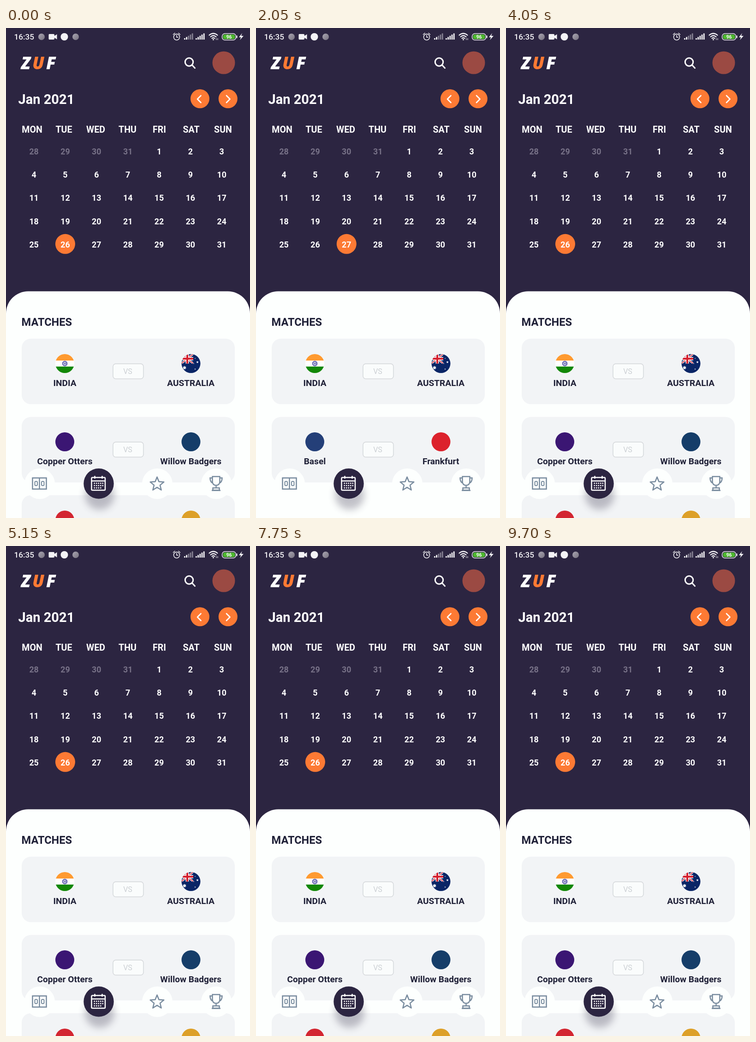
Recreate the animation shown at these times as an HTML page. Size 529x1058 px, loop 9750 ms.

```html
<!DOCTYPE html>
<html lang="en">
<head>
<meta charset="utf-8">
<title>Match calendar</title>
<style>
html, body { margin: 0; width: 100%; height: 100%; overflow: hidden; background: #2c2541; }
svg { display: block; width: 100vw; height: 100vh; }
text { font-family: Roboto, Arial, sans-serif; }
.mid { text-anchor: middle; }
.team { font-size: 19.1px; font-weight: 700; fill: #1f2037; text-anchor: middle; }
.day { font-size: 17.8px; font-weight: 700; fill: #fff; text-anchor: middle; }
.day.out { fill: #777187; }
.weekday { font-size: 19.6px; font-weight: 700; fill: #fff; text-anchor: middle; }
.line { fill: none; stroke-linecap: round; stroke-linejoin: round; }
</style>
</head>
<body>
<svg viewBox="0 0 529 1058" preserveAspectRatio="none">
  <defs>
    <clipPath id="disc"><circle r="20.5"/></clipPath>
    <filter id="soft" x="-60%" y="-60%" width="220%" height="220%"><feGaussianBlur stdDeviation="8"/></filter>
    <linearGradient id="ball" x2="1" y2="1"><stop stop-color="#aaa6b2"/><stop offset="1" stop-color="#77727f"/></linearGradient>
    <g id="india" clip-path="url(#disc)">
      <rect x="-21" y="-21" width="42" height="42" fill="#fff"/>
      <rect x="-21" y="-21" width="42" height="14.500" fill="#ff9a30"/>
      <rect x="-21" y="6.500" width="42" height="14.500" fill="#138808"/>
      <circle r="5" fill="none" stroke="#35379c" stroke-width="1.3"/>
      <circle r="3" fill="none" stroke="#35379c" stroke-width="2" stroke-dasharray=".7 .9"/>
      <circle r="1.3" fill="#35379c"/>
    </g>
    <g id="australia" clip-path="url(#disc)">
      <rect x="-21" y="-21" width="42" height="42" fill="#0a2566"/>
      <svg x="-21" y="-21" width="26" height="21" viewBox="-13 -10.500 26 21" fill="none">
        <path d="M-13-10.500 13 10.500M13-10.500-13 10.500" stroke="#fff" stroke-width="4"/>
        <path d="M-13-10.500 13 10.500M13-10.500-13 10.500" stroke="#d5202f" stroke-width="1.500"/>
        <path d="M0-11V11M-13 0H13" stroke="#fff" stroke-width="7"/>
        <path d="M0-11V11M-13 0H13" stroke="#d5202f" stroke-width="4"/>
      </svg>
      <g id="stars" fill="#fff"></g>
    </g>
  </defs>

  <rect width="529" height="1058" fill="#2c2541"/>

  <!-- status bar -->
  <g fill="#f4f3f6">
    <text x="17.500" y="25" font-size="17.200" font-weight="500">16:35</text>
    <circle cx="77" cy="19" r="7" fill="url(#ball)"/>
    <path d="M94 13h9q2 0 2 2v2l5.500-3.500v11L105 21v2q0 2-2 2h-9q-1.500 0-1.500-2v-8q0-2 1.500-2z"/>
    <circle cx="126.500" cy="19" r="8"/>
    <circle cx="151" cy="19" r="7" fill="url(#ball)"/>
    <g class="line" stroke="#f4f3f6" stroke-width="1.500">
      <circle cx="370" cy="19.500" r="6.500"/>
      <path d="M370 15.500v4.500h3M362.500 14l3.500-3M377.500 14l-3.500-3"/>
    </g>
    <g id="signal"></g>
    <g class="line" stroke="#f4f3f6" stroke-width="2.200">
      <path d="M440.500 15.500q9-7.500 18 0M443.500 19q6-5 12 0M446.500 22.300q3-2.400 6 0"/>
    </g>
    <circle cx="449.500" cy="25" r="1.600"/>
    <path d="M456 22v4M459 22v4" stroke="#f4f3f6"/>
    <rect x="468.500" y="12" width="30" height="14" rx="6" fill="none" stroke="#e9e8ed" stroke-width="1.500"/>
    <rect x="470.500" y="14" width="26" height="10" rx="4" fill="#4db82e"/>
    <rect x="499.500" y="16" width="2" height="6" rx="1"/>
    <text x="483.500" y="23" class="mid" font-size="10.500" font-weight="700">96</text>
    <path d="M512 11l-7 9h4.500l-2.500 6 8-9h-5z"/>
  </g>

  <!-- header -->
  <text x="33" y="89" font-size="37" font-weight="800" font-style="italic" letter-spacing="4" fill="#fff"
    style="font-family:'Open Sans','Noto Sans',sans-serif">Z<tspan fill="#ff7a33">U</tspan>F</text>
  <g class="line" stroke="#fff" stroke-width="3">
    <circle cx="397" cy="73.500" r="8.700"/><path d="M403.500 80l6 6.500"/>
  </g>
  <circle cx="472" cy="75" r="24.500" fill="#9b4a43"/>
  <text id="month" x="26.500" y="163.500" font-size="29" font-weight="700" fill="#fff"></text>
  <g fill="#fd7a34"><circle cx="420.500" cy="152.700" r="20.500"/><circle cx="481.300" cy="152.700" r="20.500"/></g>
  <path class="line" d="M422.500 146l-7.500 7.500 7.500 7.500M478 146l7.500 7.500-7.500 7.500" stroke="#fff" stroke-width="2.700"/>
  <g id="weekdays"></g>
  <g id="days"></g>

  <!-- match sheet -->
  <path d="M0 1058V616.500a48 48 0 0 1 48-48H481a48 48 0 0 1 48 48V1058z" fill="#fdfffe"/>
  <text x="33.500" y="643" font-size="23.600" font-weight="700" fill="#1f2037">MATCHES</text>
  <g id="matches"></g>

  <!-- navigation -->
  <circle cx="203" cy="1008" r="32" fill="#2c2541" opacity=".28" filter="url(#soft)"/>
  <g fill="#fdfffe"><circle cx="73" cy="984" r="33"/><circle cx="328" cy="984" r="33"/><circle cx="456" cy="984" r="33"/></g>
  <circle cx="201" cy="983.700" r="32.700" fill="#2c2541"/>
  <g fill="none" stroke="#788b9e" stroke-width="2.500">
    <path d="M57.500 971.500h30v24h-30zM72.500 971.500v24"/>
    <rect x="62.500" y="979" width="5.500" height="9" rx="2" stroke-width="2"/>
    <rect x="77" y="979" width="5.500" height="9" rx="2" stroke-width="2"/>
    <path id="star" stroke-linejoin="round"/>
    <path d="M447.500 968.500h16v10q0 9-8 9t-8-9zM447.500 971.500h-5q0 10 6.500 11M463.500 971.500h5q0 10-6.500 11M455.500 987.500v5M448.500 998v-5h14v5zM446 998.500h19"/>
  </g>
  <g fill="none" stroke="#fff" stroke-width="2.500">
    <rect x="185.500" y="970.500" width="29.500" height="27.500" rx="2"/>
    <path d="M186 978h29M192.500 967v6M208.500 967v6"/>
    <path d="M190.500 983h21M190.500 988h21M190.500 993h17" stroke-dasharray="2.500 2"/>
  </g>
</svg>
<script>
const LOOP = 9750;
const el = id => document.getElementById(id);
const range = n => [...Array(n).keys()];

const starPath = (cx, cy, outer, inner, points) => 'M' + range(points * 2).map(i => {
  const r = i % 2 ? inner : outer, a = Math.PI * (i / points - .5);
  return `${(cx + r * Math.cos(a)).toFixed(2)} ${(cy + r * Math.sin(a)).toFixed(2)}`;
}).join('L') + 'z';

el('star').setAttribute('d', starPath(327.5, 985, 15.5, 6.8, 5));
el('stars').innerHTML = [[-14, 9, 4.5], [9, -11, 1.2], [14, -3, 2.6], [6, 0, 1.2], [9, 12, 1.4]]
  .map(([x, y, r]) => `<path d="${starPath(x, y, r, r * .5, 7)}"/>`).join('');

el('signal').innerHTML = [[386, 2], [411, 5]].map(([x, strong]) => range(5).map(i => {
  const h = 3 + i * 2.6;
  return `<rect x="${x + i * 4.2}" y="${25 - h}" width="2.8" height="${h}" opacity="${i < strong ? 1 : .45}"/>`;
}).join('')).join('');

el('weekdays').innerHTML = ['MON', 'TUE', 'WED', 'THU', 'FRI', 'SAT', 'SUN']
  .map((d, i) => `<text class="weekday" x="${56.5 + i * 69}" y="226">${d}</text>`).join('');

// A month grid: trailing days of the previous month, this month, then the next.
function daysHtml(lead, prevLength, length, selected) {
  return range(35).map(i => {
    const n = i - lead + 1, inside = n > 0 && n <= length;
    const label = n < 1 ? prevLength + n : inside ? n : n - length;
    const x = 60.6 + i % 7 * 67.85, row = Math.floor(i / 7) * 50.4;
    const mark = inside && n === selected
      ? `<circle cx="${x}" cy="${264.7 + row}" r="21.5" fill="#fd7a34"/>` : '';
    return `${mark}<text class="day${inside ? '' : ' out'}" x="${x}" y="${272.6 + row}">${label}</text>`;
  }).join('');
}

const flag = id => (x, y) => `<use href="#${id}" x="${x}" y="${y}"/>`;
const badge = color => (x, y) => `<circle cx="${x}" cy="${y}" r="20.5" fill="${color}"/>`;

const nations = ['INDIA', flag('india'), 'AUSTRALIA', flag('australia')];
const clubs = ['Copper Otters', badge('#3b1673'), 'Willow Badgers', badge('#153d69')];
const cities = ['Basel', badge('#243f78'), 'Frankfurt', badge('#dc222c')];
const crests = ['', badge('#d32631'), '', badge('#dda028')];

const matchesHtml = list => list.map(([home, homeMark, away, awayMark], i) => {
  const y = 670.7 + i * 169;
  return `<rect x="34" y="${y}" width="462" height="141.5" rx="20" fill="#f2f4f6"/>
    ${homeMark(127.5, y + 53.8)}${awayMark(401, y + 53.8)}
    <text class="team" x="127.5" y="${y + 102.6}">${home}</text>
    <text class="team" x="400.7" y="${y + 102.6}">${away}</text>
    <rect x="232" y="${y + 54.3}" width="66" height="32.5" rx="6" fill="#fafcfc" stroke="#d4d7da" stroke-width="1.5"/>
    <text class="mid" x="264" y="${y + 76.3}" font-size="16" fill="#ccd0d4">VS</text>`;
}).join('');

const january = day => ['Jan 2021', daysHtml(4, 31, 31, day)];
const december = ['Dec 2020', daysHtml(1, 30, 31, 0)];
const today = [...january(26), matchesHtml([nations, clubs, crests])];
const tomorrow = [...january(27), matchesHtml([nations, cities])];
const earlier = [...december, today[2]];

const timeline = [[0, today], [1900, tomorrow], [3900, today], [5950, earlier], [7600, today]];
let shown;

function render(now) {
  const t = now % LOOP;
  const view = timeline.filter(([start]) => start <= t).pop()[1];
  if (view !== shown) {
    shown = view;
    el('month').textContent = view[0];
    el('days').innerHTML = view[1];
    el('matches').innerHTML = view[2];
  }
  requestAnimationFrame(render);
}
render(0);
</script>
</body>
</html>
```
